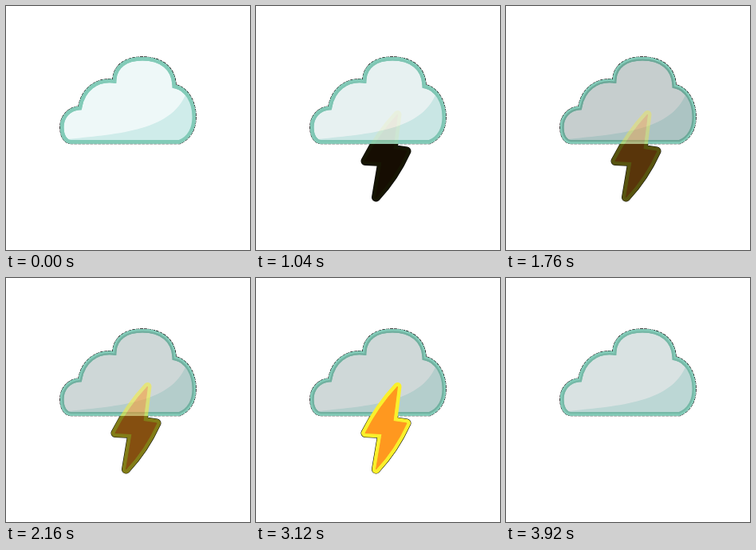
These frames come from a looping animation (306x306 px, 4000 ms). An HTML page:

```html
<!DOCTYPE html>
<html lang="en">
<head>
<meta charset="utf-8">
<title>Thunder cloud</title>
<style>
  html, body { margin: 0; width: 100%; height: 100%; overflow: hidden; background: #fff; }
  svg { display: block; width: 100vw; height: 100vh; }
</style>
</head>
<body>
<svg viewBox="0 0 306 306">
  <defs>
    <path id="cloud" d="M82 172.5C72 172.5 68 162 68 152C68 138 78 127 91 126C95 104 112 90 134 92C135 74 150 64 171 64C196 64 212 77 213 99C228 102 238 120 238 139C238 155 231 167 218 172.5Z"/>
    <path id="bolt" d="M177.5 136L172 179.5L189 182Q174 215 150.5 240L158 195.5L137 194.5Q154 161 177.5 136Z" stroke-linejoin="round"/>
    <clipPath id="inside"><use href="#cloud"/></clipPath>
  </defs>

  <g id="back"><use href="#bolt" stroke="#000" stroke-width="11"/></g>

  <use href="#cloud" fill="none" stroke="#000" stroke-width="1.5" stroke-dasharray="4 1"/>
  <g clip-path="url(#inside)" stroke="#82cbb8">
    <use href="#cloud" fill="#eef8f8" stroke-width="9"/>
    <path d="M78 167C130 161 208 159 226 109H240V175H78Z" fill="#cfecea" stroke="none"/>
    <use href="#cloud" fill="none" stroke-width="9"/>
    <use id="shade" href="#cloud" stroke="none"/>
    <use href="#cloud" fill="none" stroke-width="4.5"/>
  </g>

  <g id="front">
    <use href="#bolt" fill="#f9f02c" stroke="#f9f02c" stroke-width="10"/>
    <use href="#bolt" fill="#ff981f" stroke="#ff981f" stroke-width="1"/>
  </g>
</svg>
<script>
  const LOOP = 4000, STEP = 80;
  const LAND = 320;                                   // bolt hits the ground
  const BLINK = 540, BLINK_LEN = 920, BLINKS = 2;
  const GONE = 3880, FADE = 320;

  const $ = id => document.getElementById(id);
  const back = $('back'), front = $('front'), shade = $('shade');
  const clamp = v => Math.max(0, Math.min(1, v));

  // Darkness of the cloud: a swing that dies away
  const gloom = t => clamp(t / 400) *
    (.11 + .14 * Math.exp(-t / 2500) * Math.cos(2 * Math.PI * (t - 400) / 1480));

  const drop = t => -260 * (1 - clamp(t / LAND) ** 2);

  // Stretched while falling, then a short damped wobble
  function squash(t) {
    if (t < LAND) return -.12 * (1 - t / LAND);
    return .17 * Math.sin(Math.PI * (t - LAND) / 160) * Math.exp(-(t - 400) / 60);
  }

  function glow(t) {
    const n = (t - BLINK) / BLINK_LEN;
    return n > 0 && n < BLINKS ? Math.abs(1 - 2 * (n % 1)) : clamp((GONE - t) / FADE);
  }

  function draw(t) {
    const alpha = glow(t), s = squash(t);
    const pose = `translate(157 ${245 + drop(t)}) scale(${1 + s} ${1 - s}) translate(-157 -245)`;
    for (const part of [back, front]) part.setAttribute('transform', pose);
    front.setAttribute('opacity', alpha);
    back.setAttribute('opacity', alpha > .01 ? 1 : 0);
    shade.setAttribute('opacity', gloom(t));
  }

  const start = performance.now();
  function tick() {
    const t = (performance.now() - start) % LOOP;
    draw(Math.floor(t / STEP) * STEP);
    requestAnimationFrame(tick);
  }
  draw(0);
  requestAnimationFrame(tick);
</script>
</body>
</html>
```
